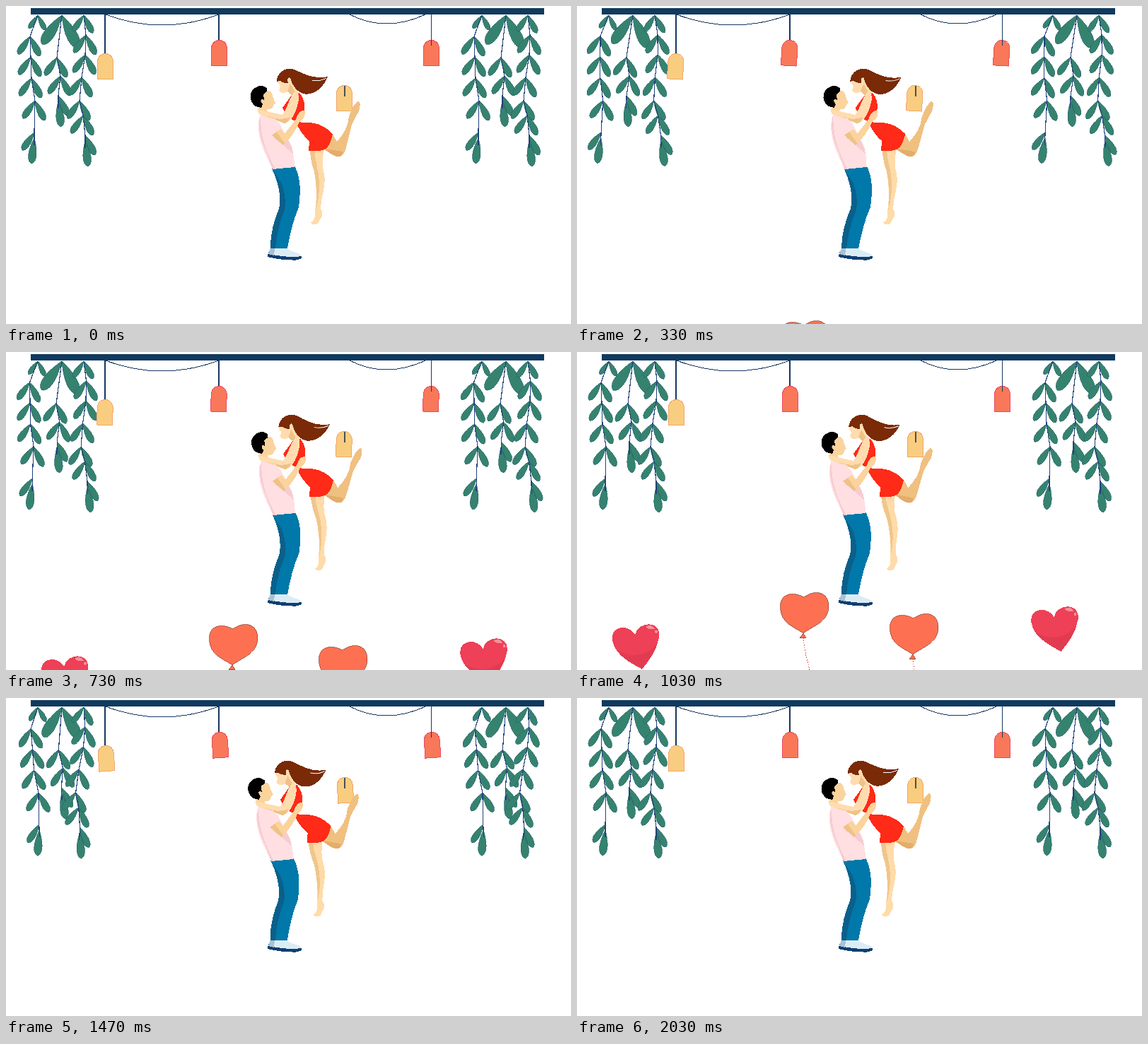
Recreate the animation shown at these times as an HTML page. Size 799 by 450 pixels, loop 2.06 s.

```html
<!DOCTYPE html>
<html lang="en">
<head>
<meta charset="utf-8">
<title>Dancing couple</title>
<style>
html, body { margin: 0; width: 100%; height: 100%; overflow: hidden; background: #fff; }
svg { display: block; }
</style>
</head>
<body>
<svg width="799" height="450" viewBox="0 0 799 450" shape-rendering="crispEdges">
  <defs>
    <g id="heart">
      <path id="heartShape" fill="#ee4056" d="M92 449C80 442 53 430 50 408C47 388 72 384 82 400C87 380 120 380 116 404C113 422 102 437 92 449Z"/>
      <path fill="#e23b51" d="M92 449C81 443 63 434 55 421C75 434 97 431 113 414C109 427 100 439 92 449Z"/>
      <path fill="#f7909c" d="M97 389Q105 384 110 392Q103 394 97 389Z"/>
      <circle cx="112" cy="396" r="2" fill="#f7909c"/>
    </g>
    <g id="balloon">
      <path fill="none" stroke="#e8604a" stroke-dasharray="2 1.5" d="M320 404Q322 425 329 450T325 495"/>
      <path fill="#fd7152" stroke="#8c3a2a" stroke-width=".7" d="M320 398C304 388 288 383 287.500 361C287 343 303 338 321 347C338 335 357 340 356 362C354 382 334 388 320 398L315 405H324Z"/>
    </g>
  </defs>

  <g id="vines"></g>
  <g fill="none" stroke="#17375f">
    <path d="M141 12Q220 42 301 12M486 12Q537 38 593 12"/>
    <path d="M139.700 12V69M301.200 12V49" stroke-width="1.800"/>
  </g>
  <g id="tags"></g>
  <path d="M601.500 12V56" stroke="#17375f"/>
  <path d="M478.700 113V128" stroke="#4b4f58" stroke-width="1.800"/>
  <rect x="35" y="3" width="726" height="9" fill="#103a5e"/>

  <g id="couple">
    <!-- her legs -->
    <g id="backLeg">
      <path fill="#f0c080" d="M461 180L447 201C456 207 464 214 472 213Q478 212 481 200L489 168Q494 157 499 149Q503 134 497 135L491 142L485 156C484 172 477 181 468 192Z"/>
      <path fill="#e3ad6a" d="M450 202L476 206Q475 218 461 210Z"/>
    </g>
    <g id="frontLeg">
      <path fill="#ffdba8" d="M431 202H450C448 214 446 224 450 238C452 250 449 262 446 275L445 287Q450 295 444 302L441 308Q433 311 431 306Q438 304 437 290C439 278 440 258 436 235Q430 218 431 202Z"/>
      <path fill="#f0c68c" d="M430 202H436C436 218 444 235 443 255Q443 270 438 289Q441 260 436 235Q430 218 430 202Z"/>
    </g>

    <!-- man -->
    <path fill="#fbd39c" d="M357 139L366 121Q376 117 377 128L381 137L378 140Q377 147 369 146L368 154L357 152Z"/>
    <path fill="#000" d="M369 116L363 113C356 112 348 117 346 124C344 132 348 139 353 142L361 144L363 139C358 134 361 130 365 133L364 125L369 121Z"/>
    <path fill="#0078a9" d="M376 230L408 226C417 243 417 262 414 285C406 303 401 325 398 343H374C373 326 379 303 386 287C390 268 384 247 376 230Z"/>
    <path fill="#0a608b" d="M376 230C386 249 390 270 386 287C379 303 373 326 374 343H381C382 325 387 306 394 289Q397 270 389 250Z"/>
    <path fill="#ffdfe2" d="M361 151C354 164 356 185 366 208L377 231L408 228C408 212 405 198 398 187L387 166L372 153Z"/>
    <path fill="#f6ccd2" d="M359 156C355 172 360 190 369 209L377 231H381Q362 195 361 173ZM378 186L392 197L406 209Q405 195 394 184Z"/>
    <path fill="#103f73" d="M371 348L370 355Q390 360 410 359.500Q420 358 418 354Z"/>
    <path fill="#dcecf5" d="M373 343H397C403 348 413 348 418 353Q410 358 371 351Z"/>
    <path fill="#a9c2d3" d="M374 343H380L379 353L371 351Z"/>

    <!-- woman -->
    <path fill="#ff2a17" d="M404 126L391 144L397 157L411 164C425 166 443 161 462 181Q458 200 450 203Q443 206 428 205L429 191Q416 180 410 164L421 151Q425 135 415 123Z"/>
    <path fill="#ffdcaf" d="M386 100L384.500 108L388 114L386 119Q389 126 399 121L405 127L414 125L406 101L398 94Z"/>
    <path fill="#efc286" d="M398 121L402 110L409 122L405 127Z"/>
    <g id="hair">
      <path fill="#7a2a07" d="M382.500 107C383 94 395 85 408 90C423 97 436 104 455 100C449 115 437 126 423 124.500Q408 122 402 102C399 100 397 103 399 109Q390 109 388 106Z"/>
      <path fill="none" stroke="#fff" d="M433 105Q444 107 453 102"/>
    </g>
    <path fill="#ffdcaf" d="M408 121C417 123 414 135 411 145C407 156 402 165 393 166Q378 161 358 153L355 146L391 154C399 143 400 130 408 121Z"/>
    <path fill="#efc286" d="M370 156Q390 163 402 157Q399 166 393 166Z"/>

    <!-- his near arm -->
    <path fill="#fbd39c" d="M374 181L388 173L394 181L410 160Q415 145 423 149Q424 158 415 164Q407 183 392 197Z"/>
    <path fill="#efc286" d="M374 181L382 177L394 194L392 197Z"/>
    <path fill="#ffdfe2" d="M366 158Q361 170 374 184L390 173L380 159Z"/>
  </g>

  <g id="floats">
    <use href="#heart"/>
    <use href="#heart" x="592.500" y="-25"/>
    <use href="#balloon"/>
    <use href="#balloon" x="155" y="30"/>
  </g>
</svg>

<script>
const LOOP = 2060, RISE_END = 1250;
const $ = id => document.getElementById(id);
const move = (el, value) => el.setAttribute('transform', value);

// A pair of leaves hangs from each node; the last has one leaf on `side` and an end leaf.
const vines = [
  { swing: 2.4, top: .75, side: -1, nodes: [[45, 13], [34, 43], [35, 72], [36, 102], [41, 134], [40, 179]] },
  { swing: 2.3, top: 1.65, side: 1, nodes: [[79, 13], [72, 73], [77, 99], [74, 127]] },
  { swing: -2.6, top: .9, side: 1, nodes: [[110, 13], [113, 41], [112, 69], [107, 101], [104, 134], [109, 155], [112, 183]] }
];

function leaf(x, y, dx, dy) {
  const at = (along, side) => `${dx * along - dy * side} ${dy * along + dx * side}`;
  return `M${x} ${y}c${at(.35, .14)} ${at(.9, .26)} ${dx} ${dy}c${at(-.1, -.26)} ${at(-.65, -.14)} ${-dx} ${-dy}z`;
}

function vine({ nodes, top, side }) {
  const last = nodes.length - 1;
  const leaves = nodes.map(([x, y], i) => {
    const size = i ? 1 : top;
    const hang = s => leaf(x, y, (s < 0 ? -17 : 14) * size, (s < 0 ? 25 : 28) * size);
    return i < last ? hang(-1) + hang(1) : hang(side) + leaf(x, y + 8, 4 * side, 36);
  });
  return `<g class="vine"><path d="${leaves.join('')}" fill="#35836f" stroke="#2a6470" stroke-width=".7"/>
    <path d="M${nodes.join('L')}v18" fill="none" stroke="#24427a" stroke-width="1.2"/></g>`;
}

$('vines').innerHTML = [0, 628].map(dx =>
  `<g transform="translate(${dx})">${vines.map(vine).join('')}</g>`).join('');

const yellow = ['#f9cd80', '#f3a56c'], red = ['#f87859', '#ee4a60'];
const tags = [[140.5, 67.5, yellow], [301.5, 48.5, red], [601.5, 48.5, red], [478.5, 112.5, yellow]];
$('tags').innerHTML = tags.map(([, , [fill, line]]) =>
  `<path d="M-11 36V12C-11 4 -6 0 0 0S11 4 11 12V36Z" fill="${fill}" stroke="${line}"/>`).join('');

const vineEls = [...document.querySelectorAll('.vine')];
const tagEls = [...$('tags').children];

// Out and back in each half loop, decelerating in every quarter.
function swayAt(t) {
  const q = t / LOOP * 4, part = Math.floor(q);
  const eased = Math.sin((q - part) * Math.PI / 2);
  return (part < 2 ? 1 : -1) * (part % 2 ? 1 - eased : eased);
}

function draw(now) {
  const t = now % LOOP;
  const sway = swayAt(t);
  const lift = (1 - Math.cos(t / LOOP * 2 * Math.PI)) / 2;

  vineEls.forEach((el, i) => {
    const { swing, nodes } = vines[i % vines.length];
    move(el, `rotate(${swing * sway} ${nodes[0]})`);
  });
  tagEls.forEach((el, i) => move(el, `translate(${tags[i][0]} ${tags[i][1]}) rotate(${4 * sway})`));

  // Lean about the shoes.
  const skew = -.015 * sway;
  move($('couple'), `matrix(1 0 ${skew} 1 ${-355 * skew} 0)`);
  move($('frontLeg'), `rotate(${-3.8 * lift} 440 203)`);
  move($('backLeg'), `rotate(${2 * lift} 460 198)`);
  move($('hair'), `translate(${2 * lift}) rotate(${3 * lift} 400 98)`);

  move($('floats'), `translate(0 ${.15 * (1030 - t)})`);
  $('floats').style.display = t < RISE_END ? '' : 'none';
}

const start = performance.now();
function tick() {
  draw(performance.now() - start);
  requestAnimationFrame(tick);
}
tick();
</script>
</body>
</html>
```
